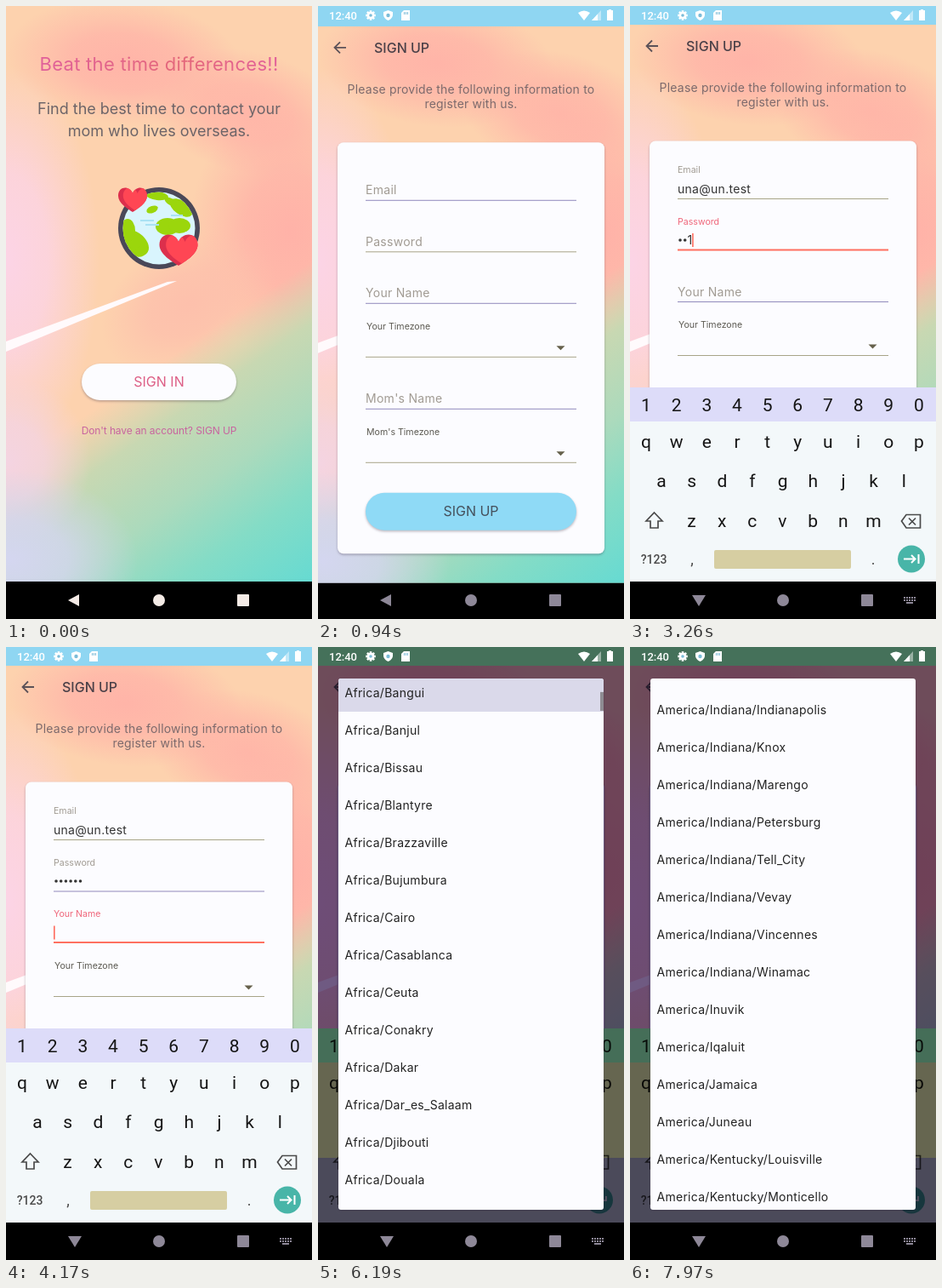
An HTML page with a canvas for the animation above (8000 ms loop, 360 by 720 pixels).

```html
<!DOCTYPE html>
<html lang="en">
<head>
<meta charset="utf-8">
<title>Sign up flow</title>
<style>
  html, body { margin: 0; width: 100%; height: 100%; overflow: hidden; background: #000; }
  canvas { display: block; width: 100vw; height: 100vh; }
</style>
</head>
<body>
<canvas id="stage"></canvas>
<script>
const W = 360, H = 720, NAV = 676, LOOP = 8000;
const canvas = document.getElementById('stage');
const ctx = canvas.getContext('2d');
const TAU = Math.PI * 2;

const clamp = v => Math.max(0, Math.min(1, v));
const progress = (t, start, length) => clamp((t - start) / length);
const easeOut = u => 1 - (1 - u) ** 3;
const mix = (a, b, u) => a + (b - a) * u;

// ---- drawing helpers ----
function text(str, x, y, size, color, { align = 'left', weight = 400, font = 'Inter', spacing = 0 } = {}) {
  ctx.font = `${weight} ${size}px ${font}, sans-serif`;
  ctx.letterSpacing = spacing + 'px';
  ctx.textAlign = align;
  ctx.fillStyle = color;
  ctx.fillText(str, x, y + size * 0.36);
  return ctx.measureText(str).width;
}
const keyText = (str, x, y, size = 21, color = '#151515') =>
  text(str, x, y, size, color, { align: 'center', font: 'Roboto' });

function rect(x, y, w, h, color) {
  ctx.fillStyle = color;
  ctx.fillRect(x, y, w, h);
}
function roundRect(x, y, w, h, r, color, shadow) {
  ctx.save();
  if (shadow) {
    ctx.shadowColor = 'rgba(60,50,70,.35)';
    ctx.shadowBlur = 3;
    ctx.shadowOffsetY = 1.5;
  }
  ctx.beginPath();
  ctx.roundRect(x, y, w, h, r);
  ctx.fillStyle = color;
  ctx.fill();
  ctx.restore();
}
function ellipse(x, y, rx, ry, color, angle = 0) {
  ctx.beginPath();
  ctx.ellipse(x, y, rx, ry, angle, 0, TAU);
  ctx.fillStyle = color;
  ctx.fill();
}
const circle = (x, y, r, color) => ellipse(x, y, r, r, color);
function shape(path, color) {
  ctx.fillStyle = color;
  ctx.fill(new Path2D(path));
}
function line(path, color, width = 1.8) {
  ctx.strokeStyle = color;
  ctx.lineWidth = width;
  ctx.stroke(new Path2D(path));
}
function glow(x, y, rx, ry, rgb, angle = 0) {
  ctx.save();
  ctx.translate(x, y);
  ctx.rotate(angle);
  ctx.scale(rx, ry);
  const g = ctx.createRadialGradient(0, 0, 0, 0, 0, 1);
  g.addColorStop(0, `rgba(${rgb},1)`);
  g.addColorStop(0.45, `rgba(${rgb},.8)`);
  g.addColorStop(1, `rgba(${rgb},0)`);
  circle(0, 0, 1, g);
  ctx.restore();
}

// ---- shared scenery ----
function background() {
  rect(0, 0, W, NAV, '#fdd2ae');
  glow(0, 300, 110, 230, '252,212,230');
  glow(140, 66, 140, 74, '255,180,168', 0.1);
  glow(285, 125, 120, 72, '255,182,168', 0.25);
  glow(335, 265, 120, 150, '255,178,168');
  glow(215, 350, 110, 75, '253,192,172', -0.5);
  const green = ctx.createLinearGradient(0, 0, 429, 630);
  green.addColorStop(0.59, 'rgba(205,215,176,0)');
  green.addColorStop(0.67, '#c8d8b2');
  green.addColorStop(0.78, '#acdabc');
  green.addColorStop(0.88, '#84dcc6');
  green.addColorStop(1, '#66dad2');
  rect(0, 0, W, NAV, green);
  glow(0, 535, 100, 100, '244,212,226');
  glow(5, 650, 150, 105, '212,214,240');
  shape('M0 394L190 324L201 323L0 406Z', '#fffafc');
}

function statusIcons() {
  const white = '#fff', hole = '#7cbcd8';
  text('12:40', 13, 11.5, 13, white, { weight: 500, font: 'Roboto' });
  for (let i = 0; i < 4; i++) {
    ctx.save();
    ctx.translate(62, 11);
    ctx.rotate(i * Math.PI / 4);
    rect(-1.3, -5.8, 2.6, 11.6, white);
    ctx.restore();
  }
  circle(62, 11, 4.3, white);
  circle(62, 11, 1.8, hole);
  shape('M82.500 5L88 7V11Q87 15 82.500 17Q78 15 77 11V7Z', white);
  circle(82.5, 11, 2.2, hole);
  shape('M101 5H108V17H98V8Z', white);
  [101, 103, 105].forEach(x => rect(x, 7, 1, 3, hole));
  shape('M313 17L306 8Q313 3 320 8Z', white);
  shape('M333 5V17H322Z', 'rgba(255,255,255,.45)');
  shape('M329 9.500V17H322Z', white);
  shape('M341 5H342V4H345V5H347V17H340V5Z', white);
}

function navBar(keyboardOpen, color, y = NAV) {
  rect(0, y, W, H - y, '#000');
  shape(keyboardOpen ? 'M73 692H89L81 705Z' : 'M73 698L86 691V705Z', color);
  circle(180, 698, 7, color);
  roundRect(272, 691, 14, 14, 1, color);
  if (keyboardOpen) {
    for (let i = 0; i < 10; i++) rect(322 + (i % 5) * 3, 694 + Math.floor(i / 5) * 3, 2, 2, color);
    rect(325, 700, 8, 2, color);
  }
}

// ---- landing screen ----
function heart(cx, cy, w, h) {
  const path = x => {
    const l = x - w / 2, r = x + w / 2;
    return new Path2D(`M${x} ${cy + h / 2}C${x - w * .18} ${cy + h * .36} ${l} ${cy + h * .12} ${l} ${cy - h * .18}` +
      `C${l} ${cy - h * .6} ${x - w * .1} ${cy - h * .62} ${x} ${cy - h * .28}` +
      `C${x + w * .1} ${cy - h * .62} ${r} ${cy - h * .6} ${r} ${cy - h * .18}` +
      `C${r} ${cy + h * .12} ${x + w * .18} ${cy + h * .36} ${x} ${cy + h / 2}`);
  };
  ctx.save();
  ctx.fillStyle = '#dc2f4c';
  ctx.fill(path(cx));
  ctx.clip(path(cx));
  ctx.fillStyle = '#ff4654';
  ctx.fill(path(cx + w * 0.17));
  ctx.restore();
}

function globe() {
  circle(180, 261, 48, '#4a4858');
  ctx.save();
  ctx.beginPath();
  ctx.arc(180, 261, 42.5, 0, TAU);
  ctx.clip();
  rect(130, 210, 100, 100, '#d9f5fd');
  const land = '#9bd60c';
  ellipse(150, 278, 20, 13, land, 0.6);
  ellipse(143, 264, 9, 14, land);
  ellipse(159, 288, 9, 6, land, -0.5);
  ellipse(190, 259, 14, 10, land);
  ellipse(204, 258, 13, 9, land);
  ellipse(206, 237, 15, 8, land, 0.6);
  ellipse(178, 223, 13, 5, land, 0.1);
  ellipse(194, 230, 8, 4, land, 0.5);
  ellipse(172, 239, 7, 4, land, -0.4);
  line('M158 252H174M164 257H180M194 246H208', '#a9e2f4', 2);
  ctx.restore();
  heart(149, 228, 34, 28);
  heart(203, 287, 45, 36);
}

function landing() {
  background();
  const tint = ctx.createLinearGradient(39, 0, 321, 0);
  tint.addColorStop(0, '#e0609a');
  tint.addColorStop(0.6, '#e4687a');
  tint.addColorStop(1, '#e2609a');
  const center = { align: 'center' };
  text('Beat the time differences!!', 180, 68, 22, tint, { align: 'center', spacing: 0.3 });
  text('Find the best time to contact your', 180, 121, 18, '#6c6468', center);
  text('mom who lives overseas.', 180, 147, 18, '#6c6468', center);
  globe();
  roundRect(89, 420, 182, 43, 21.5, '#fcfcff', true);
  text('SIGN IN', 180, 441, 16, '#dd5f86', center);
  text("Don't have an account? SIGN UP", 180, 499, 12, '#c8649f', { align: 'center', spacing: -0.1 });
}

// ---- sign-up form ----
const EMAIL_FOCUS = 1300, PASSWORD_FOCUS = 2560, NAME_FOCUS = 3960, ZONE_FOCUS = 5020, DIALOG = 5300;
const PASSWORD_KEYS = [2900, 3060, 3220, 3400, 3560, 3720];
const NAME_KEYS = [4300, 4480, 4660];
const typed = (t, times) => times.filter(time => t >= time).length;

const emailValue = t => t >= 2250 ? 'una@un.test' : 'un'.slice(0, typed(t, [1780, 1950]));
const nameValue = t => 'Una'.slice(0, typed(t, NAME_KEYS));

function passwordValue(t) {
  const count = typed(t, PASSWORD_KEYS);
  const reveal = count && t - PASSWORD_KEYS[count - 1] < 250;
  const dots = reveal ? count - 1 : count;
  for (let i = 0; i < dots; i++) circle(59 + i * 5.7, 275, 1.8, '#333');
  return dots * 5.7 + (reveal ? text('1', 56 + dots * 5.7, 275, 14, '#333') : 0);
}

const plainValue = (y, value) => t =>
  text(value(t), 56, y, 14, '#333', { spacing: 0.28 });

function field(t, label, y, start, end, drawValue, lineColor) {
  const focused = t >= start && t < end;
  const up = easeOut(progress(t, start, 150));
  text(label, 56, mix(y, y - 22, up), mix(14, 10.6, up), focused ? '#ef667a' : '#a19b93',
    { spacing: mix(0.28, 0, up) });
  if (focused) rect(56, y + 10.5, 248, 2, '#ff7060');
  else rect(56, y + 11.5, 248, 1, lineColor);
  const width = t >= start ? drawValue(t) : 0;
  if (focused) rect(56 + width, y - 8, 1.6, 16, '#ff6a5c');
}

function spinner(label, y, focused) {
  text(label, 57, y, 10.6, '#5c5a52');
  rect(56, y + 35.5, 248, focused ? 2 : 1, focused ? '#ff7060' : '#a8a488');
  shape(`M280.500 ${y + 23}H290.500L285.500 ${y + 28}Z`, '#66614c');
}

function signUp(t) {
  background();
  rect(0, 0, W, 22, '#8fd6f2');
  line('M33 47H20M26 40.500L19.500 47L26 53.500', '#5c5258', 1.8);
  text('SIGN UP', 66, 47, 16, '#4a4048', { weight: 500 });
  const intro = { align: 'center', spacing: 0.2 };
  text('Please provide the following information to', 180, 96, 14, '#7c6a6c', intro);
  text('register with us.', 180, 113, 14, '#7c6a6c', intro);

  const violet = '#918abc', olive = '#a8a488';
  roundRect(23, 158.5, 314, 483, 7, '#fcfcff', true);
  field(t, 'Email', 214.5, EMAIL_FOCUS, PASSWORD_FOCUS, plainValue(214.5, emailValue), t < EMAIL_FOCUS ? violet : olive);
  field(t, 'Password', 275, PASSWORD_FOCUS, NAME_FOCUS, passwordValue, t < EMAIL_FOCUS ? olive : violet);
  field(t, 'Your Name', 335.5, NAME_FOCUS, ZONE_FOCUS, plainValue(335.5, nameValue), violet);
  spinner('Your Timezone', 374.5, t >= ZONE_FOCUS);
  field(t, "Mom's Name", 459.5, Infinity, Infinity, null, violet);
  spinner("Mom's Timezone", 498.5, false);
  roundRect(56, 570, 248, 44, 22, '#8fdaf6', true);
  text('SIGN UP', 180, 591, 16, '#45505c', { align: 'center' });

  if (t >= ZONE_FOCUS && t < DIALOG) {
    const grow = easeOut(progress(t, ZONE_FOCUS, 90));
    circle(285.5, 399.5, 18 * grow, 'rgba(70,70,60,.17)');
  }
}

// ---- on-screen keyboard ----
function suggestions(value) {
  roundRect(-20, 456, 39, 23, 11.5, '#fff');
  line('M6 463L11 467.500L6 472', '#333', 2);
  if (!value || value.length > 2) return;
  keyText(value, 80, 468, 16, '#5a5a66');
  if (value.length < 2) return;
  rect(127, 457, 1, 22, '#c4c4d8');
  rect(231, 457, 1, 22, '#c4c4d8');
  keyText('una', 179, 457, 12.5, '#333');
  keyText('@un.test', 179, 473, 11, '#5a5a66');
}

function keyboard(t) {
  const ink = '#4a4a4a';
  const email = t < PASSWORD_FOCUS;
  const column = i => 19 + i * 35.65;
  rect(0, 448, W, 40, '#dddcf9');
  rect(0, 488, W, 188, '#f3f8fa');

  if (email) suggestions(emailValue(t));
  [...'1234567890'].forEach((digit, i) => email
    ? keyText(digit, column(i) + 11, 500.5, 9, '#555')
    : keyText(digit, column(i), 468.5));
  [['qwertyuiop', 19, 511], ['asdfghjkl', 37, 557], ['zxcvbnm', 72.5, 604]].forEach(([keys, x, y]) =>
    [...keys].forEach((key, i) => keyText(key, x + i * 35.65, y)));

  line('M28.500 595L38 605H33V613H24V605H19Z', ink, 1.7);
  line('M319.500 605L325 597.500H341.500V613H325ZM328 601.500L336 609.500M336 601.500L328 609.500', ink, 1.7);
  text('?123', 28, 650, 14, ink, { align: 'center', weight: 500, font: 'Roboto' });
  if (email) {
    keyText('@', 72, 650, 16, ink);
    line('M117 649.500A8.500 8.500 0 1 1 117 649.400M104 652Q108.500 657 113 652', ink, 1.6);
    circle(105.5, 647, 1.3, ink);
    circle(111.5, 647, 1.3, ink);
  } else {
    keyText(',', 73, 650, 18, ink);
  }
  const spaceX = email ? 135 : 99;
  roundRect(spaceX, 639, 260 - spaceX, 22, 2, '#d6cea2');
  keyText('.', 286, 650, 18, ink);
  circle(331, 649.5, 16, '#48b5a8');
  line(t < ZONE_FOCUS
    ? 'M322 649.500H335M331 645L335.500 649.500L331 654M339.500 644V655'
    : 'M339 645V650H323M327.500 645.500L323 650L327.500 654.500', '#fff', 2);
}

// ---- time zone dialog ----
const ROW = 44;
const prefixed = (prefix, names) => names.split(' ').map(name => prefix + '/' + name);
const ZONES = [
  ...prefixed('Africa', 'Abidjan Accra Addis_Ababa Algiers Asmara Bamako Bangui Banjul Bissau Blantyre Brazzaville Bujumbura Cairo Casablanca Ceuta Conakry Dakar Dar_es_Salaam Djibouti Douala El_Aaiun Freetown Gaborone Harare Johannesburg Juba Kampala Khartoum Kigali Kinshasa Lagos Libreville Lome Luanda Lubumbashi Lusaka Malabo Maputo Maseru Mbabane Mogadishu Monrovia Nairobi Ndjamena Niamey Nouakchott Ouagadougou Porto-Novo Sao_Tome Tripoli Tunis Windhoek'),
  ...prefixed('America', 'Adak Anchorage Anguilla Antigua Araguaina'),
  ...prefixed('America/Argentina', 'Buenos_Aires Catamarca Cordoba Jujuy La_Rioja Mendoza Rio_Gallegos Salta San_Juan San_Luis Tucuman Ushuaia'),
  ...prefixed('America', 'Aruba Asuncion Atikokan Bahia Bahia_Banderas Barbados Belem Belize Blanc-Sablon Boa_Vista Bogota Boise Cambridge_Bay Campo_Grande Cancun Caracas Cayenne Cayman Chicago Chihuahua Costa_Rica Creston Cuiaba Curacao Danmarkshavn Dawson Dawson_Creek Denver Detroit Dominica Edmonton Eirunepe El_Salvador Fort_Nelson Fortaleza Glace_Bay Godthab Goose_Bay Grand_Turk Grenada Guadeloupe Guatemala Guayaquil Guyana Halifax Havana Hermosillo'),
  ...prefixed('America/Indiana', 'Indianapolis Knox Marengo Petersburg Tell_City Vevay Vincennes Winamac'),
  ...prefixed('America', 'Inuvik Iqaluit Jamaica Juneau Kentucky/Louisville Kentucky/Monticello La_Paz')
];
const PRESSED = 'Africa/Bangui';
const rowCenter = (name, scroll) => 59 + ZONES.indexOf(name) * ROW - scroll;
const DRAG_END = rowCenter(PRESSED, 54);
const REST = rowCenter('America/Indiana/Indianapolis', 74);
const FLING = 6250, SECOND_FLING = 6800;

function scrollAt(t) {
  if (t < FLING) return DRAG_END * easeOut(progress(t, 5940, 230));
  if (t < SECOND_FLING) return mix(DRAG_END, 2350, easeOut(progress(t, FLING, SECOND_FLING - FLING)));
  return mix(2350, REST, easeOut(progress(t, SECOND_FLING, 600)));
}

function dim(amount) {
  ctx.save();
  ctx.globalCompositeOperation = 'multiply';
  ctx.globalAlpha = amount;
  rect(0, 0, W, 22, '#7a875f');
  rect(0, 22, W, 426, '#6f5c84');
  rect(0, 448, W, 40, '#4f805a');
  rect(0, 488, W, 112, '#6b6951');
  rect(0, 600, W, 76, '#4e4c5c');
  ctx.restore();
}

function dialog(t) {
  const shown = easeOut(progress(t, DIALOG, 160));
  const scroll = scrollAt(t);
  dim(shown);
  ctx.save();
  ctx.globalAlpha = shown;
  roundRect(24, 37, 312, 624, 3, '#fcfcff', true);
  ctx.beginPath();
  ctx.roundRect(24, 37, 312, 624, 3);
  ctx.clip();
  if (t > 5900 && t < FLING) rect(24, rowCenter(PRESSED, scroll) - 22, 312, ROW, '#dad9ea');
  ZONES.forEach((zone, i) => {
    const y = 59 + i * ROW - scroll;
    if (y > 10 && y < 690) text(zone, 31.5, y, 14, '#222', { spacing: 0.28 });
  });
  ctx.globalAlpha = shown * progress(t, 5940, 30) * (1 - progress(t, 7600, 200));
  rect(332, 44 + scroll * 0.033, 4, 22, '#8e8c92');
  ctx.restore();
}

// ---- timeline ----
function draw(t) {
  const enter = easeOut(progress(t, 820, 200));
  if (enter < 1) {
    landing();
    navBar(false, '#f4ebe6');
  }
  if (enter > 0) {
    const shift = 29 * (1 - enter);
    const top = H * (1 - Math.min(1, enter * 1.3));
    const open = easeOut(progress(t, 1330, 240));
    ctx.save();
    ctx.beginPath();
    ctx.rect(0, top, W, H);
    ctx.clip();
    ctx.save();
    ctx.translate(0, shift);
    signUp(t);
    ctx.restore();
    if (shift) rect(0, 0, W, 22 + shift, '#8fd6f2');
    if (open > 0) {
      ctx.save();
      ctx.translate(0, 228 * (1 - open));
      keyboard(t);
      ctx.restore();
    }
    if (t >= DIALOG) dialog(t);
    statusIcons();
    navBar(open > 0, '#8e8898', NAV + shift);
    ctx.restore();
  }
}

function resize() {
  const ratio = devicePixelRatio || 1;
  canvas.width = Math.round(innerWidth * ratio);
  canvas.height = Math.round(innerHeight * ratio);
}
addEventListener('resize', resize);
resize();

const start = performance.now();
function tick() {
  ctx.setTransform(canvas.width / W, 0, 0, canvas.height / H, 0, 0);
  draw((performance.now() - start) % LOOP);
  requestAnimationFrame(tick);
}
tick();
</script>
</body>
</html>
```
